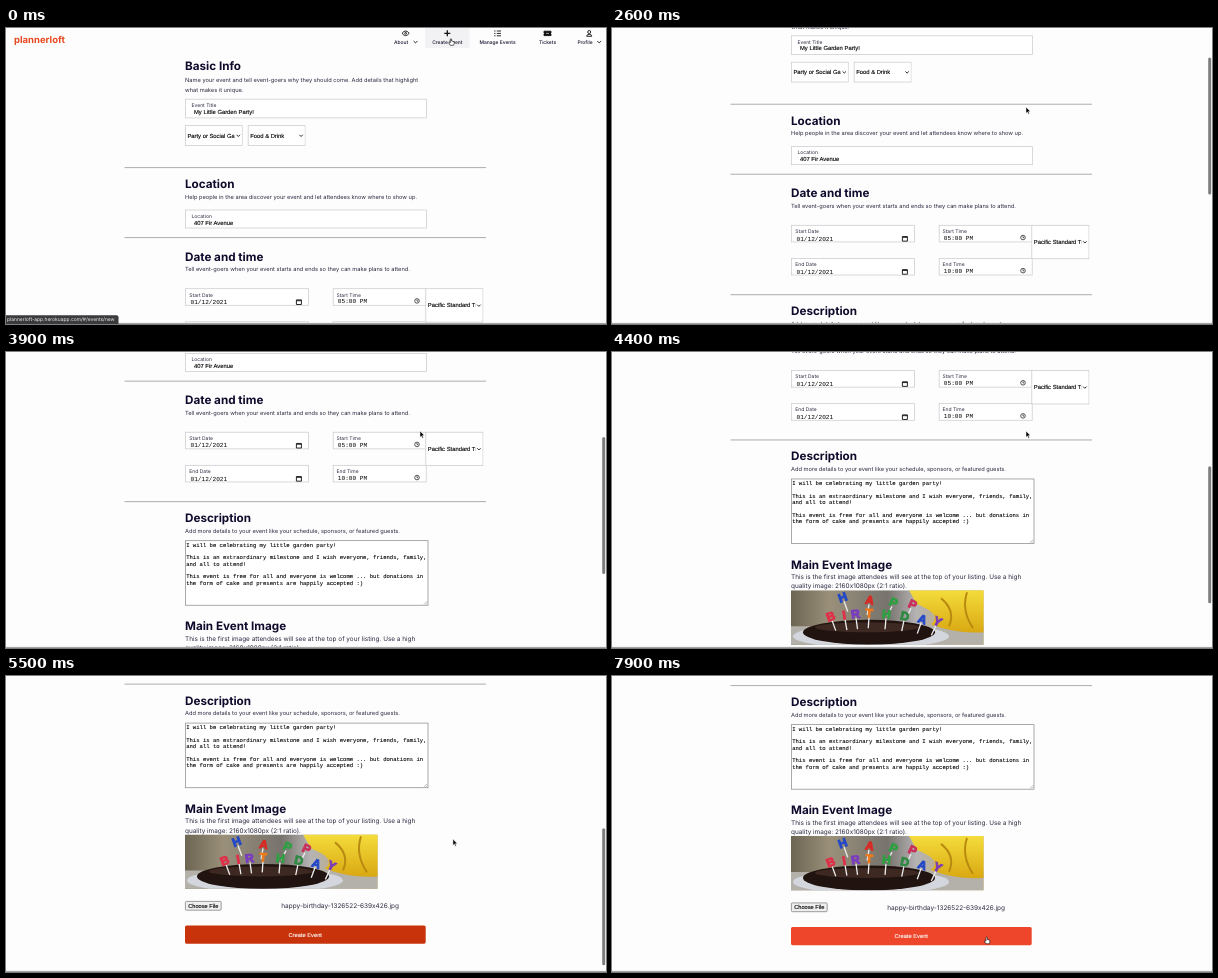
Write an HTML page that moves like this. It is 600 by 296 pixels and loops after 8 s.

```html
<!DOCTYPE html>
<html lang="en">
<head>
<meta charset="utf-8">
<title>Create an event</title>
<style>
html, body { margin: 0; width: 100%; height: 100%; overflow: hidden; background: #fdfdfd; }
svg { display: block; }
text { font: 5.7px Inter, sans-serif; fill: #2b2940; text-rendering: geometricPrecision; white-space: pre; }
.logo { font-size: 9.5px; font-weight: 700; fill: #e8481f; }
.nav text { font-size: 4.95px; font-weight: 500; fill: #15122c; text-anchor: middle; }
.head { font-size: 11.7px; font-weight: 700; fill: #0f0a2c; }
.big { font-size: 6.42px; }
.label { font-size: 5px; }
.sys { font: 5.85px "Liberation Sans", Arial, sans-serif; fill: #000; stroke: #000; stroke-width: .12; }
.mono { font: 6.12px "Liberation Mono", "Courier New", monospace; fill: #000; }
.area { font-size: 5.57px; stroke: #000; stroke-width: .1; }
.icon { fill: none; stroke: #111; stroke-width: .9; }
.box { fill: #fff; stroke: #cfcfd3; stroke-width: .8; }
.rule { stroke: #989898; stroke-width: .8; }
.letters text { font: 900 12px "Liberation Sans", Arial, sans-serif; text-anchor: middle; stroke-width: 1; }
</style>
</head>
<body>
<svg id="stage" width="600" height="296" viewBox="0 0 600 296">
  <defs>
    <linearGradient id="wall">
      <stop offset="0" stop-color="#6c6552"/><stop offset=".2" stop-color="#9a907a"/>
      <stop offset=".5" stop-color="#77736d"/><stop offset=".65" stop-color="#b5b3b4"/>
      <stop offset="1" stop-color="#c5a54a"/>
    </linearGradient>
    <linearGradient id="cloth" x2="0" y2="1">
      <stop offset="0" stop-color="#f4dc3c"/><stop offset="1" stop-color="#d9a812"/>
    </linearGradient>
  </defs>
  <g id="page">
    <rect id="navHover" x="419" width="44.5" height="20" fill="#f2f2f4"/>
    <text class="logo" x="8" y="15.4">plannerloft</text>
    <g class="nav">
      <text x="395" y="15.8">About</text>
      <text x="441.3" y="15.8">Create Event</text>
      <text x="491.5" y="15.8">Manage Events</text>
      <text x="541.5" y="15.8">Tickets</text>
      <text x="579" y="15.8">Profile</text>
    </g>
    <g class="icon">
      <path d="M407.6 13l1.9 1.9 1.9-1.9M591.3 13l1.9 1.9 1.9-1.9"/>
      <path d="M396 5.3q3.6-4.6 7.2 0q-3.6 4.6-7.2 0z"/><circle cx="399.6" cy="5.3" r=".9"/>
      <path d="M441.3 2.3v6M438.3 5.3h6" stroke-width="1.3"/>
      <path d="M490.8 3h4.2M490.8 5.4h4.2M490.8 7.8h4.2M488.2 3h1.3M488.2 5.4h1.3M488.2 7.8h1.3"/>
      <path d="M538 3.2h7v1.4q-1 .7 0 1.5v1.5h-7v-1.5q1-.8 0-1.5z" fill="#111"/>
      <path d="M540 5.4h3" style="stroke:#fff;stroke-width:.6"/>
      <circle cx="583.2" cy="4" r="1.5"/><path d="M580.7 8.3q0-2 2.5-2t2.5 2z"/>
    </g>

    <text class="head" x="179" y="41.9">Basic Info</text>
    <text x="179" y="54.2">Name your event and tell event-goers why they should come. Add details that highlight</text>
    <text x="179" y="64.2">what makes it unique.</text>
    <text class="head" x="179" y="160.3">Location</text>
    <text x="179" y="170.7">Help people in the area discover your event and let attendees know where to show up.</text>
    <text class="head" x="179" y="232.6">Date and time</text>
    <text x="179" y="243">Tell event-goers when your event starts and ends so they can make plans to attend.</text>
    <path class="rule" d="M118.5 139.6H480M118.5 209.6H480M118.5 330.1H480"/>
    <g id="fields"></g>

    <text class="head" x="179" y="350.5">Description</text>
    <text x="179" y="361">Add more details to your event like your schedule, sponsors, or featured guests.</text>
    <rect class="box" x="179.4" y="369.1" width="242.6" height="64.6" style="stroke:#949494"/>
    <path d="M418 432.9l3.2-3.2M420 432.9l1.2-1.2" stroke="#777" stroke-width=".5"/>
    <g id="story"></g>

    <text class="head" x="179" y="458.8">Main Event Image</text>
    <text class="big" x="179" y="469.4">This is the first image attendees will see at the top of your listing. Use a high</text>
    <text class="big" x="179" y="478.5">quality image: 2160x1080px (2:1 ratio).</text>
    <svg x="179" y="480.4" width="192.5" height="54.4">
      <rect width="193" height="55" fill="url(#wall)"/>
      <path d="M0 36L193 36V55H0z" fill="#b4b0aa"/>
      <path d="M118 0H193V42Q165 44 140 34Q152 24 126 14z" fill="url(#cloth)"/>
      <path d="M150 8Q165 20 158 36M176 2Q170 20 182 38" fill="none" stroke="#b98a10" stroke-width="2"/>
      <ellipse cx="80" cy="46" rx="78" ry="12" fill="#d3d6dc"/>
      <ellipse cx="78" cy="42" rx="66" ry="12.5" fill="#21130f"/>
      <ellipse cx="76" cy="37" rx="52" ry="5" fill="#3d2822"/>
      <g class="letters" id="letters"></g>
    </svg>
    <rect x="179.4" y="547.4" width="35.8" height="8.8" rx="1" fill="#efefef" stroke="#767676" stroke-width=".7"/>
    <text class="sys" style="font-size:5.65px" x="182.2" y="553.9">Choose File</text>
    <text class="big" style="font-size:6.48px" x="275.3" y="554.3">happy-birthday-1326522-639x426.jpg</text>
    <rect id="button" x="179" y="571.5" width="240.7" height="18.2" rx="1.6"/>
    <text class="sys" style="font-size:5.75px;fill:#fff;stroke:#fff" text-anchor="middle" x="299.2" y="582.8">Create Event</text>
  </g>

  <rect id="thumb" x="596.2" width="3" height="137" rx="1.5" fill="#7d7d7d"/>
  <rect y="294.9" width="600" height="1.1" fill="#a3a3a3"/>
  <g id="status">
    <path d="M0 287.3H110.5q2 0 2 2V296H0z" fill="#3b3b3e"/>
    <text x="1" y="293.4" style="font-size:4.95px;fill:#eee">plannerloft-app.herokuapp.com/#/events/new</text>
  </g>
  <g id="cursor">
    <path id="arrow" d="M0 0V6.3L1.4 5L2.4 7.2L3.4 6.8L2.5 4.6H4.4Z" fill="#000" stroke="#fff" stroke-width=".5"/>
    <path id="hand" d="M-.7 .5Q0-.5 .6 .5V2.5L3.2 3.2V5L2.5 6.8H-.8L-2.4 4.1Q-2.2 3.2-.7 4.1Z" fill="#fff" stroke="#111" stroke-width=".65"/>
  </g>
</svg>
<script>
const $ = id => document.getElementById(id);
const text = (cls, x, y, s) => `<text class="${cls}" x="${x}" y="${y}">${s}</text>`;
const box = (x, y, w, h) => `<rect class="box" x="${x}" y="${y}" width="${w}" height="${h}"/>`;
const input = (y, h, label, value) =>
  box(179.4, y, 241, h) + text('label', 185.5, y + 7.8, label) + text('sys', 188, y + 14.6, value);
const select = (x, y, w, h, value) => box(x, y, w, h) + text('sys', x + 2, y + h / 2 + 2, value) +
  `<rect x="${x + w - 7.5}" y="${y + 1}" width="7" height="${h - 2}" fill="#fff"/>` +
  `<path class="icon" d="M${x + w - 5.6} ${y + h / 2 - .7}l1.7 1.7 1.7-1.7"/>`;
const dateRow = (y, word, time) =>
  box(179.4, y, 123, 16.6) + text('label', 183.3, y + 7.8, word + ' Date') + text('mono', 184.5, y + 15.2, '01/12/2021') +
  `<path class="icon" d="M290.4 ${y + 11.2}h5v4.6h-5zM290.4 ${y + 12}h5"/>` +
  box(327.2, y, 93, 16.6) + text('label', 330.5, y + 7.8, word + ' Time') + text('mono', 331.8, y + 14.3, time) +
  `<g class="icon" style="stroke-width:.7"><circle cx="411" cy="${y + 12.2}" r="2.3"/><path d="M411 ${y + 10.8}v1.6h1.2"/></g>`;

$('fields').innerHTML =
  input(71.2, 18.7, 'Event Title', 'My Little Garden Party!') +
  select(179.4, 97.6, 56.8, 19.8, 'Party or Social Ga') +
  select(242.2, 97.6, 56.8, 19.8, 'Food &amp; Drink') +
  input(182, 18, 'Location', '407 Fir Avenue') +
  dateRow(260.7, 'Start', '05:00 PM') + dateRow(293.8, 'End', '10:00 PM') +
  select(419.8, 260.7, 57, 33.4, 'Pacific Standard Ti');

$('story').innerHTML = [
  'I will be celebrating my little garden party!', '',
  'This is an extraordinary milestone and I wish everyone, friends, family,', 'and all to attend!', '',
  'This event is free for all and everyone is welcome ... but donations in',
  'the form of cake and presents are happily accepted :)'
].map((s, i) => text('mono area', 180.2, 375.3 + i * 6.33, s)).join('');

// Letter candles: [letter, x, baseline, tilt, colour]
$('letters').innerHTML = [
  ['H', 53, 11, -20, '#2348c8'], ['A', 78, 14, 10, '#d92a25'], ['P', 101, 16, 25, '#2fa043'], ['P', 120, 18, 25, '#c8305a'],
  ['B', 41, 30, -20, '#e0304a'], ['I', 54, 29, -10, '#e0304a'], ['R', 65, 28, -8, '#7a3cc0'], ['T', 78, 27, 4, '#ee7a1c'],
  ['H', 95, 28, 5, '#2fa043'], ['D', 113, 30, 12, '#2f8a43'], ['A', 130, 33, 20, '#2348c8'], ['Y', 145, 35, 25, '#7a3cb8']
].map(([s, x, y, tilt, color]) => `<g transform="translate(${x} ${y}) rotate(${tilt})">` +
  `<path d="M0 0V11" stroke="#eee" stroke-width="1.3"/><text style="fill:${color};stroke:${color}">${s}</text></g>`).join('');

// Keys are [time, value...]; linear between them
const scrollKeys = [[2000, 0], [2300, 25], [2700, 76], [3100, 125], [3300, 132], [3450, 132],
  [3800, 168], [4400, 242], [4900, 308], [5200, 321], [5350, 322], [5500, 322], [5800, 320.5]];
const cursorKeys = [[100, 445, 10.5], [600, 441.5, 18.5], [900, 426, 40], [1600, 416, 63.5], [2000, 414, 79],
  [4700, 414, 79], [5300, 446, 160], [5500, 447, 163], [6100, 409, 211], [6400, 384.7, 238], [6800, 375, 256], [7000, 374.7, 261]];
const clamp = v => Math.max(0, Math.min(1, v));
function at(keys, t) {
  const i = keys.findIndex(k => k[0] > t);
  if (i === 0) return keys[0].slice(1);
  if (i < 0) return keys[keys.length - 1].slice(1);
  const [a, b] = [keys[i - 1], keys[i]], p = (t - a[0]) / (b[0] - a[0]);
  return a.slice(1).map((v, j) => v + (b[j + 1] - v) * p);
}

function draw(now) {
  const t = now % 8000;
  const [scroll] = at(scrollKeys, t), [x, y] = at(cursorKeys, t);
  const onNav = scroll === 0 && y < 20;
  const onButton = y + scroll > 571.5;
  const show = (id, on) => $(id).setAttribute('opacity', +on);
  $('page').setAttribute('transform', `translate(0 ${-scroll})`);
  $('cursor').setAttribute('transform', `translate(${x} ${y})`);
  $('thumb').setAttribute('y', scroll * .474 - .5);
  $('button').setAttribute('fill', onButton ? '#ee462b' : '#c8330b');
  show('thumb', t < 2000 ? 0 : clamp((6000 - t) / 300));
  show('status', clamp((1300 - t) / 200));
  show('navHover', onNav);
  show('hand', onNav || onButton);
  show('arrow', !onNav && !onButton);
  requestAnimationFrame(draw);
}
requestAnimationFrame(draw);
</script>
</body>
</html>
```
